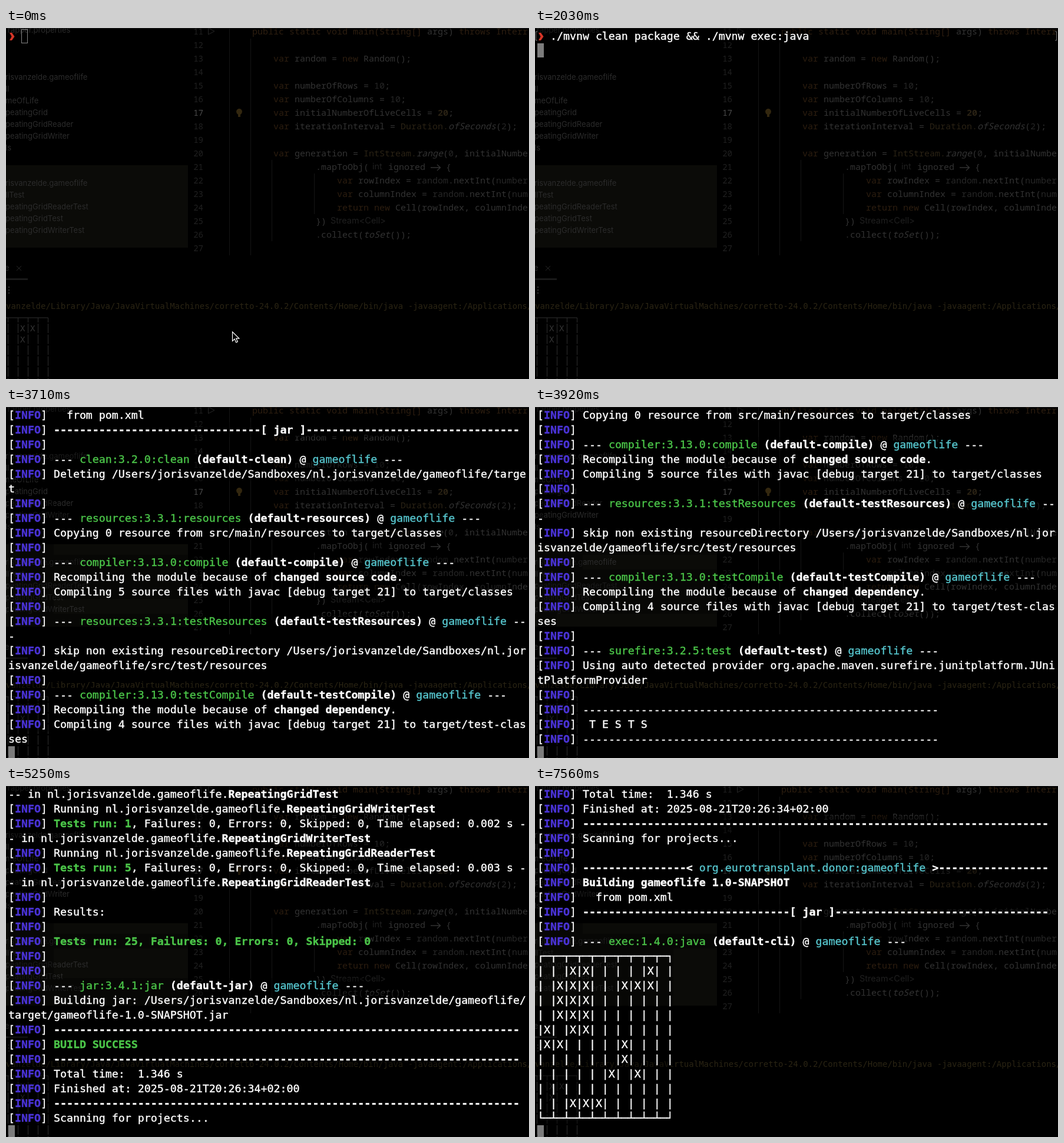
Write an HTML page that moves like this. It is 888x596 px and loops after 8 s.

```html
<!DOCTYPE html>
<html lang="en">
<head>
<meta charset="utf-8">
<title>Terminal build</title>
<style>
html, body { margin: 0; width: 100%; height: 100%; overflow: hidden; background: #000; }
#stage { position: relative; width: 888px; height: 596px; overflow: hidden; background: #000; }
svg { position: absolute; left: 0; top: 0; }
text { white-space: pre; }
.code { font: 15px "Noto Sans Mono", monospace; fill: #323232; }
.nums { font: 14px "Noto Sans Mono", monospace; fill: #202020; text-anchor: end; }
.tree { font: 13px Inter, sans-serif; fill: #2b2b2b; }
.hint { font: 14.5px Inter, sans-serif; fill: #1f1f1f; }
.out { font: 14px "DejaVu Sans Mono", monospace; }
.k { fill: #2c1d0f; }
.t { fill: #2a2214; }
.d { fill: #262626; }
.e { font-style: italic; }
#view { position: absolute; left: 4px; top: 1px; }
#log { position: relative; width: 884px; overflow: hidden; color: #fff;
  font: 18.25px/25px "DejaVu Sans Mono", monospace; white-space: pre; -webkit-text-stroke: .4px; }
#log div { width: fit-content; height: 25px; background: rgba(0, 0, 0, .4); }
#log span { font-weight: bold; }
#log .g, #log .c { font-weight: normal; }
.g, .s { color: #4bc549; }
.c { color: #56c5cd; }
.i { color: #4a33d6; }
#cursor { position: absolute; left: 0; top: 0; width: 11px; height: 24px;
  box-sizing: border-box; border: 1.5px solid #858585; }
#cursor.solid { background: #7c7c7c; border: 0; }
</style>
</head>
<body>
<div id="stage">
<svg width="888" height="596">
  <path d="M0 .5H888" stroke="#1c1c1c"/>
  <path d="M0 233H309V373H0Z" fill="#0b0b08"/>
  <path d="M379.5 0V386M415.5 18V386M451.5 224V362M523.5 247V316" stroke="#151515"/>
  <g class="tree" id="tree"><text x="3" y="8">rapper.properties</text></g>
  <g class="nums" id="nums"></g>
  <path d="M343.5 0V11L354 5.5Z" fill="none" stroke="#262626"/>
  <path d="M391 142a5 5 0 0 1 10 0q0 3-3 5v4h-4v-4q-3-2-3-5" fill="#33270f"/>
  <g class="code">
    <text x="418" y="11"><tspan class="k">public static void main(String[]</tspan> args) <tspan class="k">throws Interr</tspan></text>
    <text x="454" y="57"><tspan class="k">var</tspan> random = <tspan class="k">new</tspan> Random();</text>
    <text x="454" y="103"><tspan class="k">var</tspan> numberOfRows = <tspan class="d">10</tspan>;</text>
    <text x="454" y="126"><tspan class="k">var</tspan> numberOfColumns = <tspan class="d">10</tspan>;</text>
    <text x="454" y="149"><tspan class="k">var</tspan> initialNumberOfLiveCells = <tspan class="t" font-weight="bold">20</tspan>;</text>
    <text x="454" y="172"><tspan class="k">var</tspan> iterationInterval = <tspan class="t">Duration.</tspan><tspan class="e">ofSeconds</tspan>(<tspan class="d">2</tspan>);</text>
    <text x="454" y="218"><tspan class="k">var</tspan> generation = <tspan class="t">IntStream.</tspan><tspan class="e">range</tspan>(<tspan class="d">0</tspan>, initialNumbe</text>
    <text x="526" y="241">.mapToObj(</text>
    <text x="649" y="241">ignored</text>
    <path d="M721 237H737M732 232l5.5 5-5.5 5" fill="none" stroke="#323232" stroke-width="1.3"/>
    <text x="747" y="241">{</text>
    <text x="562" y="264"><tspan class="k">var</tspan> rowIndex = <tspan class="d">random</tspan>.nextInt(<tspan class="d">number</tspan></text>
    <text x="562" y="287"><tspan class="k">var</tspan> columnIndex = <tspan class="d">random</tspan>.nextInt(<tspan class="d">num</tspan></text>
    <text x="562" y="310"><tspan class="k">return new</tspan> Cell(rowIndex, columnInde</text>
    <text x="526" y="333">})</text>
    <text x="526" y="356">.collect(<tspan class="e">toSet</tspan>());</text>
  </g>
  <text class="hint" x="622" y="240">int</text>
  <text class="hint" x="551" y="332">Stream&lt;Cell&gt;</text>
  <text class="tree" x="-2" y="412">e</text>
  <path d="M18 404l8 8m0-8l-8 8" stroke="#262626"/>
  <path d="M0 426.5H37" stroke="#1e1e1e" stroke-width="2.5"/>
  <path d="M5 439v12" stroke="#333" stroke-width="2" stroke-dasharray="2 3"/>
  <text class="out" x="0" y="477" fill="#2a2413">vanzelde/Library/Java/JavaVirtualMachines/corretto-24.0.2/Contents/Home/bin/java -javaagent:/Applications/</text>
  <path d="M0 492H71.5" stroke="#303030"/>
  <path d="M3.5 492V500M20.5 492V500M37.5 492V500M54.5 492V500M71.5 492V500" stroke="#2d2d2d"/>
  <path d="M3.5 502V596M20.5 502V596M37.5 502V596M54.5 502V596M71.5 502V596" stroke="#2d2d2d" stroke-dasharray="16 2.5"/>
  <g class="out" fill="#343434"><text x="24" y="515">X</text><text x="41" y="515">X</text><text x="24" y="534">X</text></g>
</svg>
<div id="view"><div id="log"></div></div>
<div id="cursor"></div>
<svg width="888" height="596">
  <g id="prompt">
    <path d="M6 8h4l4.500 6.500-4.500 6.500h-4l3.500-6.500z" fill="#d43527"/>
    <path id="marks" d="M4 6H1.500V21H4M883 6h2.500V21H883" fill="none" stroke="#777"/>
  </g>
  <path id="pointer" d="M384.500 516v15.500l3.600-3.400 2.600 5.800 2.600-1.100-2.500-5.700h5z" fill="#000" stroke="#fff" stroke-width="1.200"/>
</svg>
</div>
<script>
const $ = id => document.getElementById(id);
const LOOP = 8000, ROWS = 23, LINE = 25, CELL = 10.985;

// Dimmed editor behind the terminal
const addText = (group, x, y, str) => {
  const el = document.createElementNS("http://www.w3.org/2000/svg", "text");
  el.setAttribute("x", x);
  el.setAttribute("y", y);
  el.textContent = str;
  group.append(el);
  return el;
};
for (let n = 11; n <= 27; n++) {
  const el = addText($("nums"), 335, 11 + (n - 11) * 23, n);
  if (n === 17) el.style.fill = "#4a4a4a";
}
const tree = [
  [88, "risvanzelde.gameoflife", "ll", "meOfLife", "peatingGrid", "peatingGridReader", "peatingGridWriter", "ls"],
  [268, "risvanzelde.gameoflife", "llTest", "peatingGridReaderTest", "peatingGridTest", "peatingGridWriterTest"]
];
for (const [y, ...names] of tree)
  names.forEach((name, i) => addText($("tree"), -1, y + i * 20, name));

// Build log: {x text} marks a styled run of class x
const dash = n => "-".repeat(n);
const info = (str = "") => "[{i INFO}] " + str;
const rule = info(`{b ${dash(72)}}`);
const goal = (name, id, end = "---") => info(`--- {g ${name}} {b (${id})} @ {c gameoflife} ${end}`);
const pkg = "nl.jorisvanzelde.gameoflife";
const project = [
  info("Scanning for projects..."),
  info(),
  info(`{b ${dash(16)}<} {c org.eurotransplant.donor:gameoflife} {b >${dash(17)}}`),
  info("{b Building gameoflife 1.0-SNAPSHOT}"),
  info("  from pom.xml"),
  info(`{b ${dash(32)}[ jar ]${dash(33)}}`),
  info()
];
const suite = (name, runs, secs) => {
  const split = runs < 10;
  return [
    info(`Running ${pkg}.{b ${name}}`),
    info(`{s Tests run: ${runs}}, Failures: 0, Errors: 0, Skipped: 0, Time elapsed: ${secs} s ${split ? "-" : ""}`),
    `${split ? "-" : "--"} in ${pkg}.{b ${name}}`
  ];
};

// Conway's rule on a grid whose edges wrap
const SIZE = 10;
const first = ["237", "279", "16", "24", "03", "01", "567", "", "47", "3"]
  .map(row => Array.from({ length: SIZE }, (_, c) => row.includes(c)));
const evolve = grid => grid.map((row, r) => row.map((alive, c) => {
  let near = 0;
  for (let dr = -1; dr <= 1; dr++)
    for (let dc = -1; dc <= 1; dc++)
      if ((dr || dc) && grid[(r + dr + SIZE) % SIZE][(c + dc + SIZE) % SIZE]) near++;
  return near === 3 || (alive && near === 2);
}));
const gridLines = grid => [
  "┌" + "─┬".repeat(SIZE - 1) + "─┐",
  ...grid.map(row => "|" + row.map(alive => (alive ? "X" : " ") + "|").join("")),
  "└" + "─┴".repeat(SIZE - 1) + "─┘"
];

const lines = [
  "  ./mvnw clean package && ./mvnw exec:java",
  ...project,
  goal("clean:3.2.0:clean", "default-clean"),
  info("Deleting /Users/jorisvanzelde/Sandboxes/nl.jorisvanzelde/gameoflife/targe"),
  "t",
  info(),
  goal("resources:3.3.1:resources", "default-resources"),
  info("Copying 0 resource from src/main/resources to target/classes"),
  info(),
  goal("compiler:3.13.0:compile", "default-compile"),
  info("Recompiling the module because of {b changed source code}."),
  info("Compiling 5 source files with javac [debug target 21] to target/classes"),
  info(),
  goal("resources:3.3.1:testResources", "default-testResources", "--"),
  "-",
  info("skip non existing resourceDirectory /Users/jorisvanzelde/Sandboxes/nl.jor"),
  "isvanzelde/gameoflife/src/test/resources",
  info(),
  goal("compiler:3.13.0:testCompile", "default-testCompile"),
  info("Recompiling the module because of {b changed dependency}."),
  info("Compiling 4 source files with javac [debug target 21] to target/test-clas"),
  "ses",
  info(),
  goal("surefire:3.2.5:test", "default-test"),
  info("Using auto detected provider org.apache.maven.surefire.junitplatform.JUni"),
  "tPlatformProvider",
  info(),
  info(dash(55)),
  info(" T E S T S"),
  info(dash(55)),
  ...suite("CellTest", 5, "0.021"),
  ...suite("RepeatingGridTest", 14, "0.013"),
  ...suite("RepeatingGridWriterTest", 1, "0.002"),
  ...suite("RepeatingGridReaderTest", 5, "0.003"),
  info(),
  info("Results:"),
  info(),
  info("{s Tests run: 25, Failures: 0, Errors: 0, Skipped: 0}"),
  info(),
  info(),
  goal("jar:3.4.1:jar", "default-jar"),
  info("Building jar: /Users/jorisvanzelde/Sandboxes/nl.jorisvanzelde/gameoflife/"),
  "target/gameoflife-1.0-SNAPSHOT.jar",
  rule,
  info("{s BUILD SUCCESS}"),
  rule,
  info("Total time:  1.346 s"),
  info("Finished at: 2025-08-21T20:26:34+02:00"),
  rule,
  ...project,
  goal("exec:1.4.0:java", "default-cli")
];
const gridStart = lines.length;
const generations = [first, evolve(first)].map(gridLines);
lines.push(...generations[0]);

const markup = str => str.replace(/</g, "&lt;").replace(/\{(\w) (.*?)\}/g, '<span class="$1">$2</span>');
$("log").innerHTML = lines.map(str => `<div>${markup(str)}</div>`).join("");
const rowEls = [...$("log").children];

// Bursts of output: start time, then the line count after each 70 ms tick
const STEP = 70;
const bursts = [
  [2030, 1],
  [3080, 2, 6, 8, 11, 12, 14, 18],
  [3710, 28, 30, 32, 36],
  [4340, 37, 50, 54, 63],
  [5250, 64, 68, 70, 71, 83]
];
const lineCount = t => {
  let count = 1;
  for (const [start, ...counts] of bursts)
    counts.forEach((n, i) => { if (t >= start + i * STEP) count = n; });
  return count;
};

let shownGen = 0;
const showGeneration = gen => {
  if (gen === shownGen) return;
  shownGen = gen;
  generations[gen].forEach((str, i) => { rowEls[gridStart + i].textContent = str; });
};

function draw(t) {
  const count = lineCount(t), scroll = Math.max(0, count - ROWS);
  const entered = t >= 2030, recalled = t >= 910;
  $("log").style.height = count * LINE + "px";
  $("log").style.transform = `translateY(${-scroll * LINE}px)`;
  rowEls[0].style.visibility = recalled ? "visible" : "hidden";
  $("prompt").style.display = scroll ? "none" : "";
  $("marks").style.display = entered ? "" : "none";
  showGeneration(t >= 7560 ? 1 : 0);

  const row = entered ? count - scroll : 0;
  const col = entered ? 0 : recalled ? 42 : 2;
  $("cursor").className = t >= 70 ? "solid" : "";
  $("cursor").style.transform = `translate(${4 + col * CELL}px, ${2 + row * LINE - (row ? 1 : 0)}px)`;

  const fade = t < 70 ? 0 : Math.floor((t - 70) / STEP) + 1;
  $("pointer").style.opacity = Math.max(0, 1 - fade / 4);
}

const begin = performance.now();
function tick() {
  draw((performance.now() - begin) % LOOP);
  requestAnimationFrame(tick);
}
tick();
</script>
</body>
</html>
```
